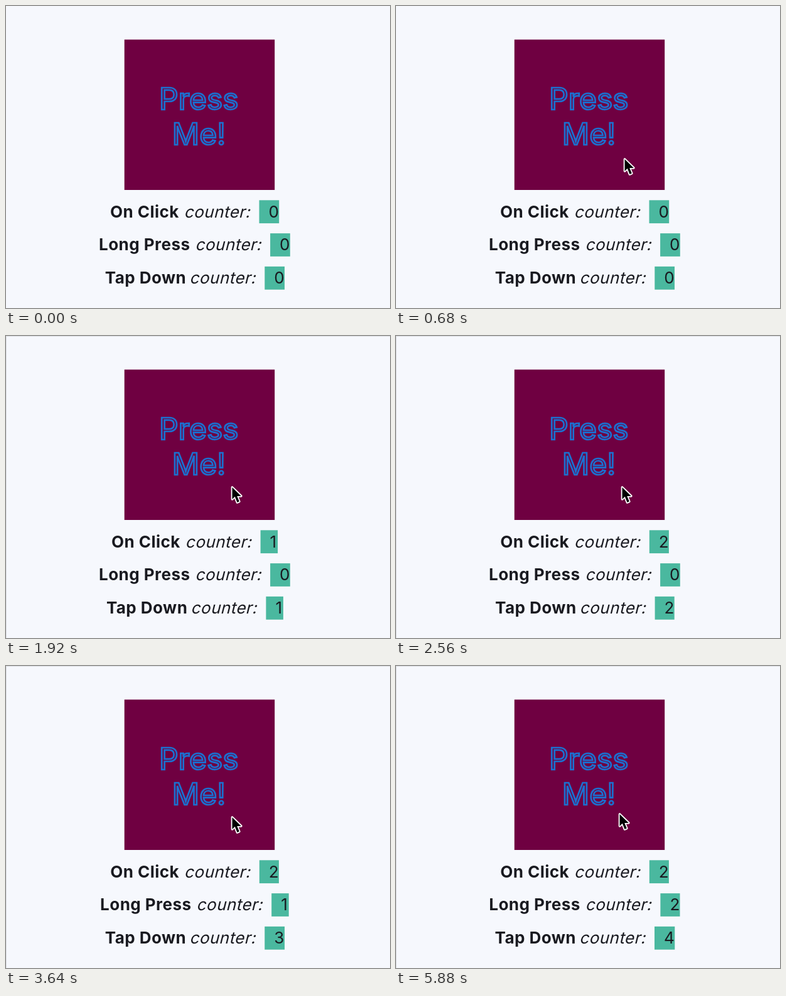
Recreate the animation shown at these times as an HTML page. Size 612 px wide and 481 px high, loop 6000 ms.

```html
<!DOCTYPE html>
<html lang="en">
<head>
<meta charset="utf-8">
<title>Press counters</title>
<style>
  html, body { margin: 0; width: 100%; height: 100%; overflow: hidden; background: #f6f8fd; }
  svg { display: block; }
  text { font: 26px Inter, sans-serif; font-optical-sizing: none; letter-spacing: .46px; fill: #191a20; }
  .bold { font-weight: 700; }
  .title text { font-size: 48px; letter-spacing: 0; fill: none; stroke: #1b70d0; stroke-width: 2.7; }
</style>
</head>
<body>
<svg width="612" height="481" viewBox="0 0 612 481">
  <rect width="612" height="481" fill="#f6f8fd"/>
  <path id="edge" d="M0 .5H612M.5 0V481" stroke="#dddfe4"/>
  <rect x="188.7" y="53.5" width="239.5" height="239.5" fill="#6f0041"/>
  <g class="title">
    <text x="244" y="164.8">Press</text>
    <text x="264.8" y="220.8">Me!</text>
  </g>
  <g id="rows"></g>
  <path id="cursor" d="M1.5 3V22L5.8 17.8L9.5 27L12.8 25.6L9.2 16.9H15.8Z"
        fill="#000" stroke="#fff" stroke-width="3.6" stroke-linejoin="round" paint-order="stroke"/>
</svg>
<script>
const LOOP = 6000, STEP = 40;
const boxWidth = [31.7, 27.5, 31.1, 31.8, 32.3]; // depends on the digit shown

// hits: the times at which each counter goes up by one
const rows = [
  { name: 'On Click', y: 336.6, x: 166, word: 283.5, box: 403.5, hits: [1400, 2560] },
  { name: 'Long Press', y: 389.4, x: 148, word: 301.2, box: 421.1, hits: [3640, 4960] },
  { name: 'Tap Down', y: 442.2, x: 157.8, word: 292.2, box: 412.3, hits: [1280, 2480, 3280, 4560] }
];

// pointer stops: time, x, y
const stops = [
  [40, 598, 468], [160, 585, 450], [320, 585, 450], [680, 363, 241],
  [720, 363, 241], [960, 359, 238], [4120, 359, 238], [4280, 355, 233]
];

const byId = id => document.getElementById(id);

byId('rows').innerHTML = rows.map(r => `
  <g transform="translate(0 ${r.y})">
    <text class="bold" x="${r.x}">${r.name}</text>
    <text transform="translate(${r.word}) skewX(-14)">counter:</text>
    <rect x="${r.box}" y="-27.3" height="36.8" fill="#4ab89f"/>
    <text class="count" x="${r.box + 15}"></text>
  </g>`).join('');

rows.forEach((r, i) => {
  r.group = byId('rows').children[i];
  r.rect = r.group.querySelector('rect');
  r.count = r.group.querySelector('.count');
});

function pointerAt(t) {
  const i = stops.findIndex(s => s[0] > t);
  if (i < 0) return stops[stops.length - 1].slice(1);
  const [t0, x0, y0] = stops[i - 1], [t1, x1, y1] = stops[i];
  const p = (t - t0) / (t1 - t0), k = p * p * (3 - 2 * p);
  return [x0 + (x1 - x0) * k, y0 + (y1 - y0) * k];
}

function draw(t) {
  for (const r of rows) {
    const n = r.hits.filter(h => h <= t).length;
    const shift = (boxWidth[0] - boxWidth[n]) / 2; // rows stay centred
    r.group.setAttribute('transform', `translate(${shift} ${r.y})`);
    r.rect.setAttribute('width', boxWidth[n]);
    r.count.textContent = n;
  }
  byId('edge').style.display = t >= 1280 ? '' : 'none';
  const visible = t >= stops[0][0];
  byId('cursor').style.display = visible ? '' : 'none';
  if (visible) byId('cursor').setAttribute('transform', `translate(${pointerAt(t)})`);
}

const start = performance.now();
function tick() {
  const t = (performance.now() - start) % LOOP;
  draw(Math.floor(t / STEP) * STEP);
  requestAnimationFrame(tick);
}
tick();
</script>
</body>
</html>
```
